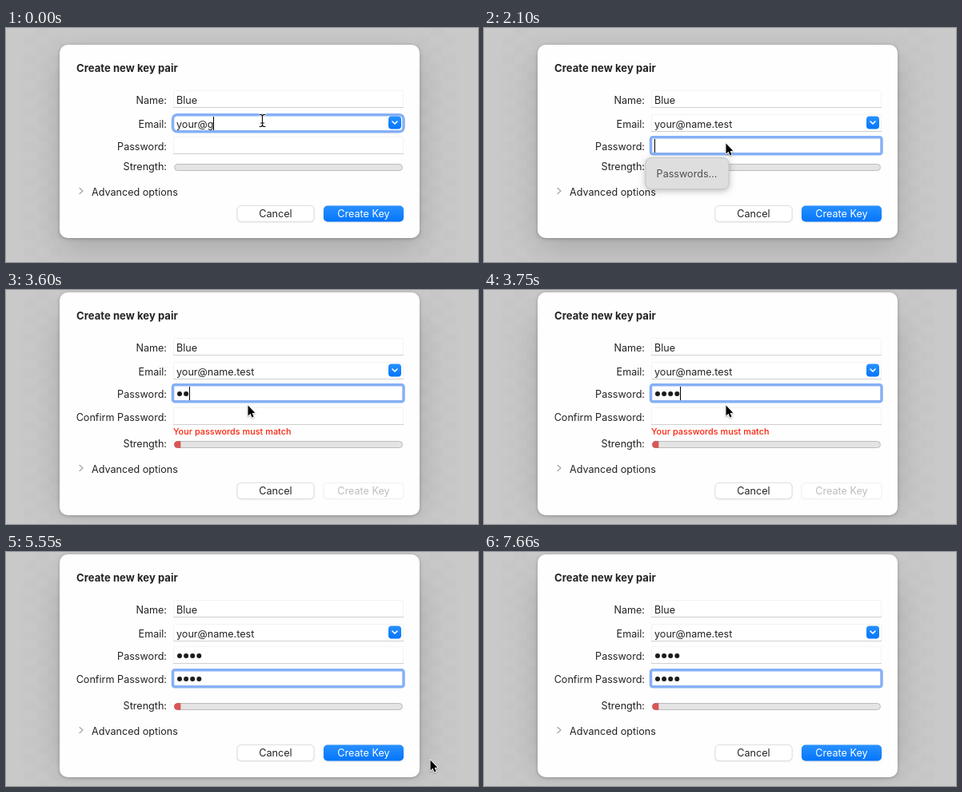
An HTML page with a canvas for the animation above (7760 ms loop, 590 by 293 pixels).

```html
<!DOCTYPE html>
<html lang="en">
<head>
<meta charset="utf-8">
<title>Create new key pair</title>
<style>
  html, body { margin: 0; width: 100%; height: 100%; overflow: hidden; background: #c9c9c9; }
  canvas { display: block; }
</style>
</head>
<body>
<canvas id="stage" width="590" height="293"></canvas>
<script>
const ctx = document.getElementById('stage').getContext('2d');
const LOOP = 7760, TICK = 150;
const FONT = 'Inter, "Liberation Sans", sans-serif';
const INK = '#222', RING = '#86b0f5';
const TYPED = ['g', '', 'n', 'na', 'nam', 'name', 'name.', 'name.t', 'name.test'];
const CARET_OFF = [[2700, 3300], [5100, 5700], [6300, 6750], [7350, LOOP]];
// Pointer waypoints: time, x, y
const PATH = [
  [1650, 298, 127], [2100, 302, 144], [4500, 302, 144], [4650, 306, 150],
  [4950, 420, 226], [5400, 532, 259], [5700, 528, 261], [6000, 458, 258],
  [6450, 449, 241], [7050, 449, 241], [7200, 465, 253], [7500, 541, 288]
];

function box(x, y, w, h, r, fill, stroke, line = 1) {
  ctx.beginPath();
  ctx.roundRect(x, y, w, h, r);
  if (fill) { ctx.fillStyle = fill; ctx.fill(); }
  if (stroke) { ctx.strokeStyle = stroke; ctx.lineWidth = line; ctx.stroke(); }
}

function shadowed(color, blur, dy, paint) {
  ctx.save();
  ctx.shadowColor = color;
  ctx.shadowBlur = blur;
  ctx.shadowOffsetY = dy;
  paint();
  ctx.restore();
}

function text(str, x, mid, { align = 'left', color = INK, size = 12.6, weight = 400, spacing = 0 } = {}) {
  ctx.font = `${weight} ${size}px ${FONT}`;
  ctx.letterSpacing = spacing + 'px';
  ctx.textAlign = align;
  ctx.fillStyle = color;
  ctx.fillText(str, x, mid + 5);
  return ctx.measureText(str).width;
}

function polyline(points, color, width) {
  ctx.beginPath();
  points.forEach(([x, y]) => ctx.lineTo(x, y));
  ctx.strokeStyle = color;
  ctx.lineWidth = width;
  ctx.lineCap = ctx.lineJoin = 'round';
  ctx.stroke();
}

function blue(top, height) {
  const fill = ctx.createLinearGradient(0, top, 0, top + height);
  fill.addColorStop(0, '#2891ff');
  fill.addColorStop(1, '#0475fb');
  return fill;
}

function backdrop() {
  ctx.fillStyle = '#c9c9c9';
  ctx.fillRect(0, 0, 590, 293);
  shadowed('rgba(0,0,0,.16)', 40, 14, () => box(67, 21, 450, 242, 12, '#c2c2c2'));
  ctx.fillStyle = 'rgba(0,0,0,.012)';
  for (let row = 0; row < 27; row++)
    for (let col = 0; col < 3; col++)
      if ((row + col) % 2) {
        ctx.fillRect(22 + col * 16, row * 11, 16, 11);
        ctx.fillRect(546 - col * 16, row * 11, 16, 11);
      }
}

function field(label, mid, focused, radius = 1) {
  text(label, 201, mid, { align: 'right' });
  box(209.5, mid - 11.5, 287, 21, 1, '#fff', '#f3f3f3');
  ctx.fillStyle = '#cfcfcf';
  ctx.fillRect(209, mid + 9, 288, 1);
  if (focused) box(208.5, mid - 11.25, 288.5, 21, radius + 1.5, '#fff', RING, 3.5);
}

function dots(count, mid) {
  ctx.fillStyle = '#1c1c1c';
  for (let i = 0; i < count; i++) {
    ctx.beginPath();
    ctx.arc(217 + i * 8.1, mid, 3, 0, 7);
    ctx.fill();
  }
}

function caret(x, mid) {
  ctx.fillStyle = '#000';
  ctx.fillRect(Math.round(x), mid - 9, 1, 17);
}

function button(label, x, w, mid, style) {
  const primary = style === 'primary', off = style === 'disabled';
  const fill = primary ? blue(mid - 10, 20) : '#fff';
  shadowed(off ? 'rgba(0,0,0,.06)' : 'rgba(0,0,0,.2)', 2, 0.5, () => box(x, mid - 10, w, 20, 5, fill));
  if (!primary) box(x, mid - 10, w, 20, 5, null, off ? '#f0f0f0' : '#e0e0e0');
  text(label, x + w / 2, mid - 0.5, { align: 'center', color: primary ? '#fff' : off ? '#bdbdbd' : INK });
}

function popup(top) {
  shadowed('rgba(0,0,0,.3)', 8, 2, () => box(202, top, 104, 39, 7, '#dedede'));
  box(202, top, 104, 39, 7, null, '#c6c6c6');
  text('Passwords…', 253.5, top + 19, { align: 'center', color: '#505050' });
}

function arrow(x, y) {
  const tip = [[0.5, 0.5], [0.5, 13.5], [3.5, 10.8], [5.5, 15.5], [7.6, 14.6], [5.6, 10], [9.3, 9.7]];
  const outline = [...tip, tip[0]].map(([dx, dy]) => [x + dx, y + dy]);
  shadowed('rgba(0,0,0,.3)', 2, 1, () => polyline(outline, '#fff', 1.8));
  ctx.fillStyle = '#000';
  ctx.fill();
}

function beam(x, y) {
  const strokes = [
    [[x - 3.5, y - 7.5], [x - 1.5, y - 7.5], [x, y - 6], [x + 1.5, y - 7.5], [x + 3.5, y - 7.5]],
    [[x, y - 6], [x, y + 6]],
    [[x - 2, y + 3], [x + 2, y + 3]],
    [[x - 3.5, y + 7.5], [x - 1.5, y + 7.5], [x, y + 6], [x + 1.5, y + 7.5], [x + 3.5, y + 7.5]]
  ];
  for (const [color, width] of [['#fff', 2.5], ['#111', 1.2]])
    strokes.forEach(points => polyline(points, color, width));
}

function pointer(t, now) {
  if (now >= 7660) return;
  if (t < PATH[0][0]) return beam(320.5, 116);
  const next = PATH.findIndex(p => p[0] > t);
  if (next < 0) return arrow(...PATH.at(-1).slice(1));
  const [t0, x0, y0] = PATH[next - 1], [t1, x1, y1] = PATH[next];
  const k = (t - t0) / (t1 - t0);
  arrow(x0 + (x1 - x0) * k, y0 + (y1 - y0) * k);
}

function draw(now) {
  const t = Math.floor(now / TICK) * TICK;
  const open = t >= 3600;
  const up = open ? -18 : 0, down = open ? 19 : 0;
  const focus = t < 2100 ? 'email' : t < 4050 ? 'password' : 'confirm';
  const first = t < 3600 ? 0 : t < 3750 ? 2 : 4;
  const second = t < 4200 ? 0 : Math.min(4, (t - 4050) / TICK + 1);
  const mismatch = open && second < 4;
  const blinkOn = !CARET_OFF.some(([a, b]) => t >= a && t < b);

  backdrop();
  shadowed('rgba(0,0,0,.25)', 4, 1, () => box(67, 21 + up, 450, 242 + down - up, 10, '#fefefe'));
  text('Create new key pair', 88, 50 + up, { weight: 700, size: 13, spacing: 0.07 });

  field('Name:', 90 + up, false);
  text('Blue', 213, 90 + up);

  const emailMid = 120 + up;
  field('Email:', emailMid, focus === 'email', 4);
  const email = 'your@' + TYPED[Math.min(TYPED.length - 1, t / TICK)];
  const emailWidth = text(email, 213, emailMid);
  box(478, emailMid - 9.5, 16, 16, 4, blue(emailMid - 9.5, 16));
  polyline([[483, emailMid - 3], [486, emailMid], [489, emailMid - 3]], '#fff', 1.6);

  const passMid = 148 + up;
  field('Password:', passMid, focus === 'password');
  dots(first, passMid);

  const confirmMid = 159;
  if (open) {
    field('Confirm Password:', confirmMid, focus === 'confirm');
    dots(second, confirmMid);
  }
  if (mismatch) text('Your passwords must match', 209, 176, { size: 10.8, weight: 500, color: '#fa2008', spacing: 0.05 });

  text('Strength:', 201, 173 + down, { align: 'right' });
  box(210.5, 170.5 + down, 285, 8, 4, '#e4e4e4', '#bcbcbc');
  if (open) box(210.5, 170.5 + down, 7.5, 8, [4, 0, 0, 4], '#dc5555', '#c95050', 0.6);

  polyline([[92, 200.5 + down], [96, 204 + down], [92, 207.5 + down]], '#a4a4a4', 1.2);
  text('Advanced options', 107, 205 + down);
  button('Cancel', 289, 96, 232.5 + down, 'plain');
  button('Create Key', 397, 100, 232.5 + down, mismatch ? 'disabled' : 'primary');

  if (blinkOn) {
    if (focus === 'email') caret(213 + emailWidth, emailMid);
    if (focus === 'password') caret(213 + first * 8.1, passMid);
    if (focus === 'confirm') caret(213 + second * 8.1, confirmMid);
  }
  if (focus === 'password' && !first) popup(162.5);
  if (focus === 'confirm' && !second) popup(173.5);
  pointer(t, now);
}

function frame() {
  draw(performance.now() % LOOP);
  requestAnimationFrame(frame);
}
frame();
</script>
</body>
</html>
```
